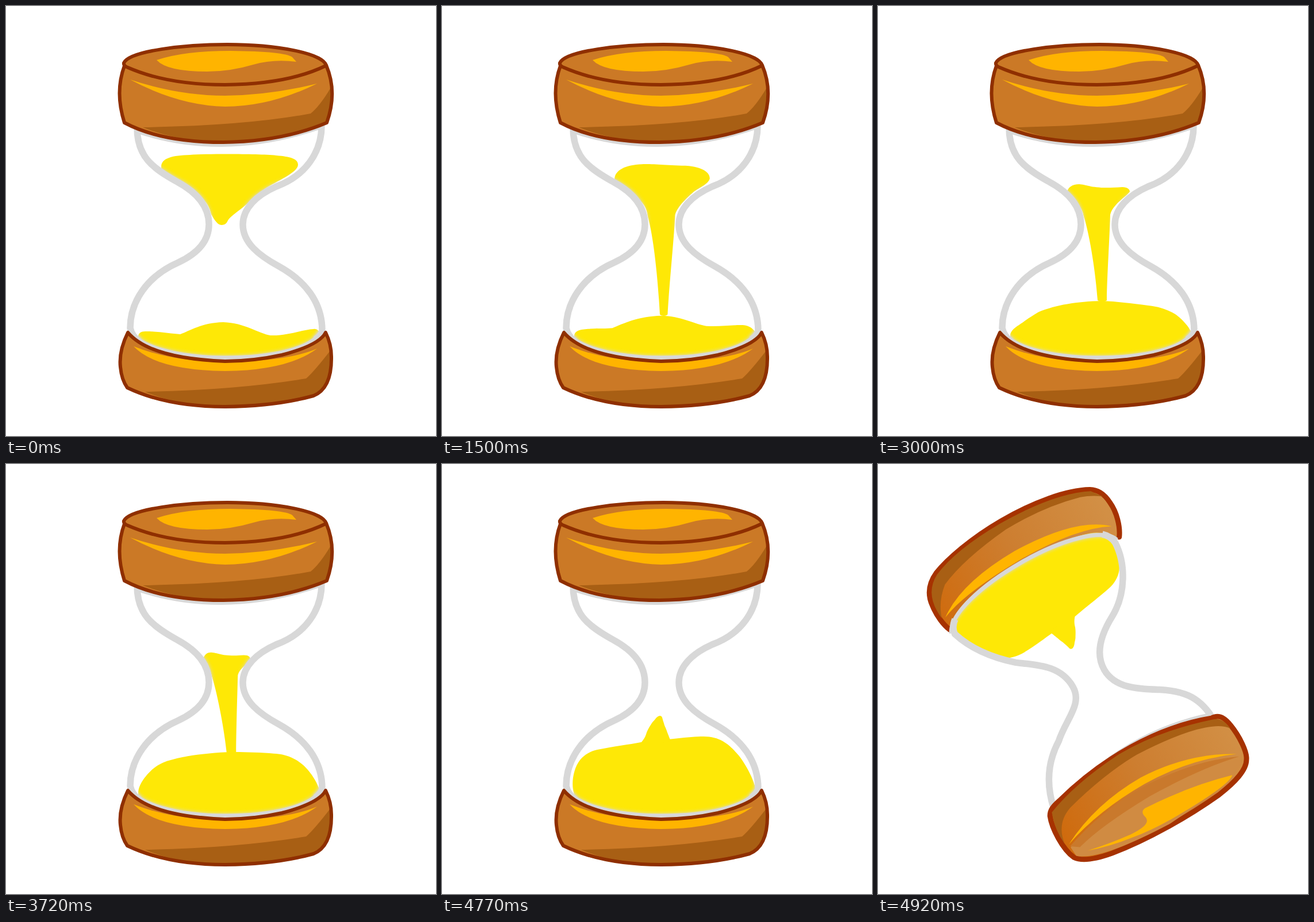
An HTML page that plays this animation: 748x748 px, repeating every 4.95 s.

```html
<!DOCTYPE html>
<html lang="en">
<head>
<meta charset="utf-8">
<title>Hourglass</title>
<style>
  html, body { margin: 0; width: 100%; height: 100%; overflow: hidden; background: #fff; }
  svg { display: block; width: 100vw; height: 100vh; }
  .wood { fill: #cb7926; }
  .shade { fill: #a85f14; }
  .shine { fill: #ffb400; }
  .line { fill: none; stroke: #8f2f00; stroke-width: 6; stroke-linejoin: round; }
  .edge { fill: url(#grain); stroke: #a63200; stroke-width: 9; stroke-linejoin: round; stroke-linecap: round; }
  .glass { fill: none; stroke: #d8d8d8; stroke-width: 11.5; }
  .rim { fill: none; stroke: #d8d8d8; stroke-width: 7; }
  .sand { fill: #fee806; }
</style>
</head>
<body>
<svg viewBox="0 0 748 748">
  <defs>
    <linearGradient id="grain" gradientUnits="userSpaceOnUse" x1="200" y1="0" x2="565" y2="0">
      <stop offset="0" stop-color="#d29046"/>
      <stop offset=".5" stop-color="#cd7e30"/>
      <stop offset="1" stop-color="#cf6a0c"/>
    </linearGradient>
    <filter id="soft"><feGaussianBlur stdDeviation="3"/></filter>
    <path id="walls" d="M228,212 C228,262 255,282 298,306 C335,326 353,350 353,380 C353,412 330,432 300,446
      C245,470 216,515 216,560 Q219,574 232,584 M538,580 Q549,573 550,565
      C550,515 520,478 475,453 C440,434 412,412 412,380 C412,352 436,329 470,314 C520,296 549,255 549,208"/>
    <path id="slimWalls" d="M228,214 C230,258 252,280 283,300 C312,318 349,340 349,378 C349,412 320,436 290,452
      C250,474 224,520 222,560 Q223,574 234,584 M530,584 Q542,575 543,562
      C533,530 512,498 476,466 C450,446 411,425 411,380 C411,345 450,337 480,310 C520,285 538,250 546,212"/>
    <path id="floor" d="M217,563 C225,592 300,612 381,612 C460,612 533,597 548,566"/>
    <clipPath id="inSand"><use href="#mound"/><use href="#stream"/></clipPath>
  </defs>

  <g id="scene">
    <g class="tilted">
      <path class="edge" d="M211,565 C200,580 193,605 195,625 C196,645 203,655 214,662 C250,682 310,692 375,692
        C435,692 490,681 518,670 C540,660 550,645 552,625 C555,605 552,585 547,573"/>
      <path class="shade" d="M200,640 Q215,652 235,659 Q300,677 375,675 Q465,667 515,645 Q540,625 549,597
        Q555,648 518,667 Q470,688 380,689 Q270,688 214,659 Z"/>
      <path class="shine" d="M213,588 Q270,617 381,617 Q495,615 543,595 Q490,634 381,635 Q260,632 213,588 Z"/>
    </g>

    <use href="#floor" fill="#fff"/>
    <path id="mound" class="sand"/>
    <path id="stream" class="sand"/>
    <use href="#floor" class="rim"/>
    <path class="rim" d="M228,218 Q300,242 375,241.5 Q460,241 549,210"/>
    <g class="upright">
      <use href="#walls" class="glass"/>
      <g clip-path="url(#inSand)"><use href="#walls" class="glass" filter="url(#soft)"/></g>
    </g>
    <use href="#slimWalls" class="glass tilted"/>
    <g clip-path="url(#inSand)"><use href="#floor" class="rim" filter="url(#soft)"/></g>

    <g class="upright">
      <path class="wood" d="M206,104 Q189,150 206,203 Q270,237 378,237 Q480,236 558,203 Q577,150 557,103
        C550,82 470,67 385,67 C310,67 215,78 204,101 Z"/>
      <path class="shade" d="M238,211 Q420,208 530,187 Q546,174 565,142 Q570,170 558,203 Q480,236 378,237 Q300,236 238,211 Z"/>
      <path class="shine" d="M216,128 Q300,156 381,156 Q460,155 541,135 Q460,175 381,175 Q300,173 216,128 Z"/>
      <path class="shine" d="M262,94 Q310,78 390,78 Q485,79 498,89 L505,97 Q465,92 430,102 Q390,114 350,114 Q280,114 262,94 Z"/>
      <path class="line" d="M206,104 Q189,150 206,203 Q270,237 378,237 Q480,236 558,203 Q577,150 557,103
        C550,82 470,67 385,67 C310,67 215,78 205,99 Q204,104 212,107 C260,128 320,137 381,137 Q490,136 556,104"/>
      <path class="wood" d="M212,568 Q196,600 199,628 Q201,650 211,664 Q280,697 381,697 Q470,696 535,678
        Q567,665 566,610 Q566,588 556,568 Q545,590 480,607 Q430,618 381,618 Q250,613 212,568 Z"/>
      <path class="shade" d="M242,671 Q400,668 522,648 Q536,636 566,597 Q570,665 535,678 Q470,696 381,697 Q300,696 242,671 Z"/>
      <path class="shine" d="M222,592 Q290,619 381,619 Q490,618 541,596 Q490,634 381,635 Q260,633 222,592 Z"/>
      <path class="line" d="M212,568 Q196,600 199,628 Q201,650 211,664 Q280,697 381,697 Q470,696 535,678
        Q567,665 566,610 Q566,588 556,568 Q545,590 480,607 Q430,618 381,618 Q250,613 212,568 Z"/>
    </g>

    <g class="tilted">
      <path class="edge" d="M230,212 C214,212 209,200 207,185 C203,160 205,130 213,119 C222,103 250,95 285,90
        C350,84 430,84 497,95 C530,101 550,110 558,122 C568,145 566,185 558,205 C553,214 545,217 530,220
        C430,246 320,246 230,212 Z"/>
      <path class="shade" d="M560,150 Q555,188 520,200 Q440,221 374,222 Q290,218 247,203 Q220,194 210,180
        Q212,204 229,209 Q320,239 400,238 Q490,233 552,209 Q563,180 560,150 Z"/>
      <path fill="#d08b42" d="M218,122 Q245,98 385,89 Q520,94 553,122 L554,140 Q480,160 388,162 Q290,158 218,122 Z"/>
      <path fill="#c9792c" d="M221,130 Q290,146 390,148 Q490,146 540,132 L554,142 Q480,168 390,168 Q290,163 221,130 Z"/>
      <path class="shine" d="M223,136 Q300,170 388,171 Q480,171 554,146 Q480,184 388,184 Q295,180 223,136 Z"/>
      <path class="shine" d="M248,108 Q258,97 343,95 Q410,93 452,101 Q495,107 531,120 Q490,111 452,107
        Q412,104 415,120 Q419,133 408,134 Q320,129 248,108 Z"/>
    </g>
  </g>
</svg>

<script>
const LOOP = 4950, STEP = 30, TURN = 4770;

// [time, outline]; outlines of one list share their structure
const base = " C520,592 470,611 385,611 C300,611 226,600 230,574 Z";
const rest = "M230,574 C232,565 240,566 250,566 C270,567 290,570 303,571 C320,565 340,551 378,550 C415,551 440,570 460,573 C490,574 515,563 535,562 C541,561 546,566 546,572" + base;
const mound = [
  [0, rest],
  [850, rest],
  [2130, "M230,574 C230,560 250,560 265,557 C275,555 283,553 290,550 C310,541 340,529 385,528 C415,528 440,538 460,541 C485,543 505,545 520,549 C535,553 546,566 546,572" + base],
  [3000, "M230,574 C230,562 245,556 255,548 C265,541 273,536 280,532 C310,520 345,514 390,513 C415,514 440,517 470,521 C490,523 505,529 517,536 C530,545 545,562 546,572" + base],
  [4410, "M230,574 C229,555 240,530 251,518 C260,507 270,505 280,502 C310,496 345,493 378,490 C400,488 440,487 462,487 C490,487 505,499 517,512 C532,528 545,556 546,572" + base],
  [4770, "M230,574 C224,558 228,530 240,515 C248,505 260,499 270,497 C300,491 325,488 346,484 C390,480 430,474 455,474 C488,474 503,492 517,508 C532,528 546,556 546,572" + base]
];
const stream = [
  [0, "M270,280 C270,264 290,260 320,259 C350,257 440,257 470,260 C495,262 508,266 508,276 C508,290 470,305 450,318 C430,333 414,350 406,355 C396,363 388,368 385,375 C382,382 372,383 367,377 C363,373 360,368 357,362 C353,345 345,335 325,322 C305,305 270,295 270,280 Z"],
  [600, "M283,288 C283,272 310,259 345,258 C370,257 418,257 440,260 C472,264 485,276 485,286 C485,300 455,313 442,322 C426,335 410,352 406,364 C404,400 392,500 389,549 C386,552 382,552 378,549 C376,500 370,410 358,366 C357,345 345,335 325,322 C305,309 283,302 283,288 Z"],
  [900, "M289,291 C289,275 315,262 350,261 C375,260 410,260 430,264 C465,268 478,280 478,290 C478,304 452,314 440,322 C425,335 408,352 406,366 C404,400 393,500 390,547 C386,550 382,550 378,547 C376,500 370,410 358,366 C357,345 345,335 325,322 C305,310 289,305 289,291 Z"],
  [2130, "M312,312 C312,296 325,291 345,290 C362,290 370,295 430,293 C448,296 453,302 453,310 C450,315 443,318 435,325 C422,337 408,350 405,362 C404,400 396,490 395,526 C391,529 385,529 380,526 C377,480 370,410 358,366 C355,348 345,338 332,328 C320,321 312,318 312,312 Z"],
  [3000, "M328,328 C329,315 338,310 350,310 C366,311 372,319 425,315 C434,315 438,319 438,323 C436,326 433,328 430,331 C418,341 406,352 404,363 C403,400 398,480 398,512 C394,515 387,515 382,512 C379,470 370,405 358,366 C355,350 347,342 340,338 C332,334 328,332 328,328 Z"],
  [3690, "M341,342 C342,329 348,325 356,325 C370,326 375,333 415,330 C424,330 427,333 426,337 C424,340 421,342 418,345 C412,350 405,356 403,364 C402,400 400,470 400,502 C395,505 389,505 384,502 C380,465 370,405 358,366 C356,356 351,350 348,347 C343,344 341,346 341,342 Z"],
  [4410, "M372,402 C374,397 375,392 378,391 C380,390 381,390 383,392 C386,395 388,400 390,404 C396,414 401,422 404,427 C411,438 411,438 411,442 C410,455 407,475 407,488 C398,492 388,492 378,488 C378,480 362,462 361,440 C360,425 362,422 365,416 C367,411 370,407 372,402 Z"],
  [4770, "M370,445 C372,442 374,440 376,439 C379,437 382,438 383,441 C384,445 385,448 386,451 C387,455 388,457 389,459 C391,464 393,470 394,472 C395,475 396,477 398,482 C385,486 360,487 346,485 C352,478 354,474 356,467 C358,462 361,457 363,454 C365,450 368,447 370,445 Z"]
];

const $ = id => document.getElementById(id);
const show = (name, on) => document.querySelectorAll("." + name)
  .forEach(el => el.style.display = on ? "" : "none");

function morph(keys, t) {
  const next = keys.findIndex(key => key[0] > t);
  if (next < 0) return keys[keys.length - 1][1];
  const [t0, from] = keys[next - 1], [t1, to] = keys[next];
  const goal = to.match(/\d+/g), k = (t - t0) / (t1 - t0);
  let i = 0;
  return from.replace(/\d+/g, n => (+n + (goal[i++] - n) * k).toFixed(2));
}

function draw() {
  const t = Math.floor(performance.now() % LOOP / STEP) * STEP;
  const angle = Math.max(0, t - TURN);   // one degree per millisecond
  $("mound").setAttribute("d", morph(mound, t));
  $("stream").setAttribute("d", morph(stream, t));
  $("scene").setAttribute("transform", `rotate(${angle} 374 374)`);
  show("upright", angle === 0);
  show("tilted", angle > 0);
  requestAnimationFrame(draw);
}
draw();
</script>
</body>
</html>
```
